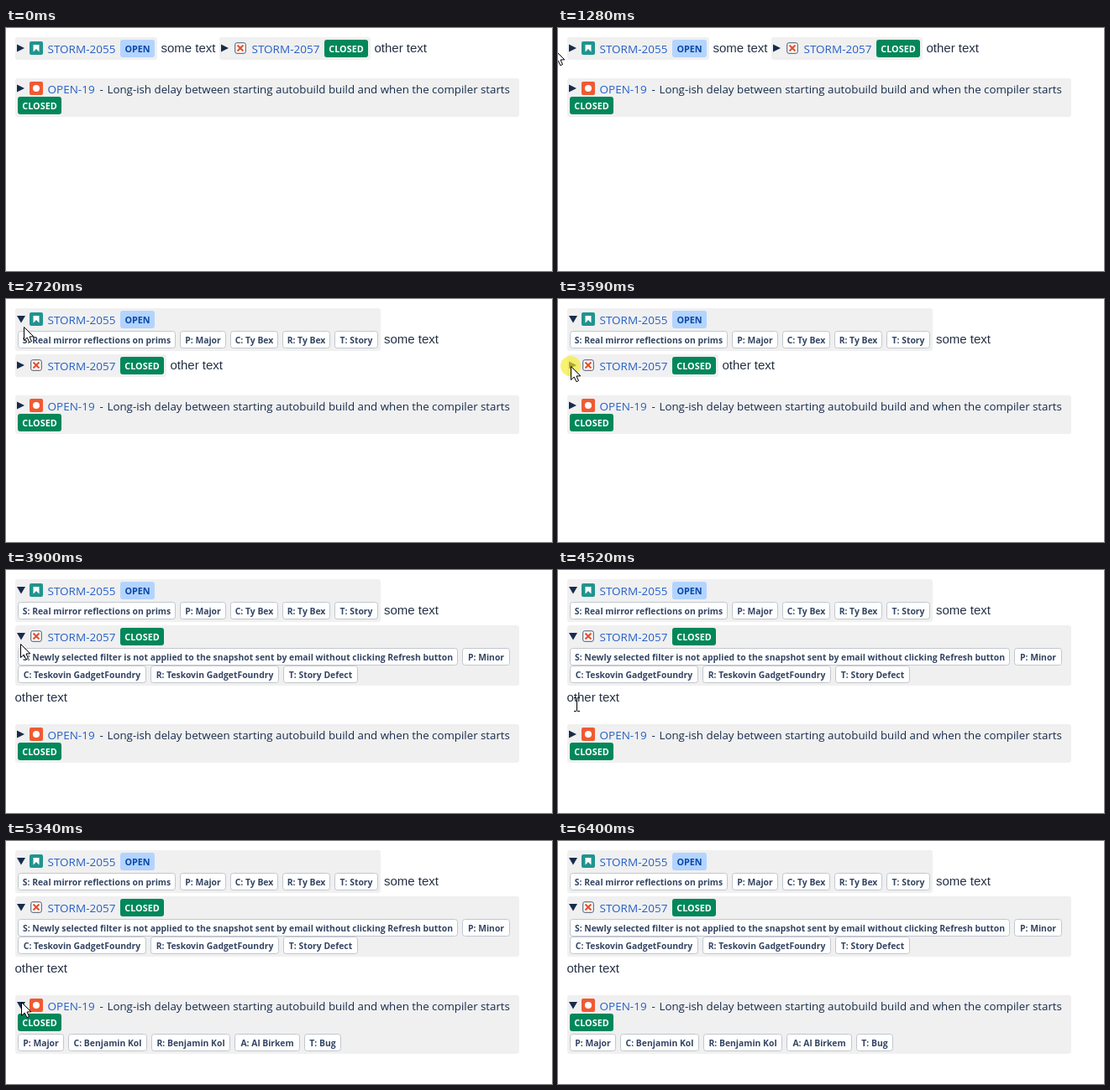
Recreate the animation shown at these times as an HTML page with a canvas. Size 650 px wide and 290 px high, loop 7.73 s.

```html
<!DOCTYPE html>
<html lang="en">
<head>
<meta charset="utf-8">
<title>Expandable issue macros</title>
<style>
html, body { margin: 0; width: 100%; height: 100%; overflow: hidden; background: #fff; }
canvas { display: block; }
</style>
</head>
<body>
<canvas id="stage" width="650" height="290"></canvas>
<script>
const ctx = document.getElementById('stage').getContext('2d');
const LOOP = 7730;
const UI = '"Open Sans", "Noto Sans", sans-serif';
const ARIAL = '15px "Liberation Sans", Arial, sans-serif';
const NAVY = '#172b4d', GREEN = '#00875a', ORANGE = '#f05a33', TEAL = '#20948f';

const expandAt = [2130, 3720, 5340];
const clicks = [[2070, 2130, 16, 21], [3590, 3720, 15, 80], [5200, 5340, 18, 192]];

// Pointer legs: start, end, steps, from, control, to
const legs = [
  [1280, 1590, 6, [-8, 27], [4, 24], [16, 21]],
  [2470, 3190, 12, [16, 21], [27.5, 34], [15, 78]],
  [3250, 3250, 1, [15, 78], [15, 79], [15, 80]],
  [3900, 4640, 12, [15, 80], [26, 128], [20, 176]],
  [4720, 5060, 6, [20, 176], [19, 184], [18, 192]],
  [6070, 6400, 5, [18, 192], [3, 192.5], [-13, 193]]
];

function text(s, x, y, font, color, align = 'left') {
  ctx.font = font;
  ctx.fillStyle = color;
  ctx.textAlign = align;
  ctx.fillText(s, x, y);
}

function box(x, y, w, h, fill, r = 3, stroke) {
  ctx.beginPath();
  ctx.roundRect(x, y, w, h, r);
  ctx.fillStyle = fill;
  ctx.fill();
  if (stroke) {
    ctx.strokeStyle = stroke;
    ctx.stroke();
  }
}

function poly(points, fill, stroke) {
  ctx.beginPath();
  points.forEach(p => ctx.lineTo(...p));
  ctx.closePath();
  ctx.fillStyle = fill;
  ctx.fill();
  if (stroke) {
    ctx.strokeStyle = stroke;
    ctx.stroke();
  }
}

const panel = (y, w, h) => box(11, y, w, h, '#f0f0f0');

function badge(x, y, label) {
  const open = label === 'OPEN', w = open ? 41 : 52;
  box(x, y, w, 21, open ? '#b3d4ff' : GREEN);
  text(label, x + w / 2, y + 15, `bold 10.8px ${UI}`, open ? '#0747a6' : '#fff', 'center');
}

function chips(y, list) {
  for (const [x, right, label] of list) {
    box(x + .5, y + .5, right - x - 1, 20, '#fff', 3, '#c1c7d0');
    text(label, (x + right) / 2, y + 14.5, `bold 10.37px ${UI}`, '#344563', 'center');
  }
}

const icons = {
  story() {
    box(28, 16, 16, 16, TEAL, 2);
    poly([[32.5, 20], [39.5, 20], [39.5, 28.5], [36, 25], [32.5, 28.5]], '#fff');
  },
  defect() {
    box(29.75, 17.75, 12.5, 12.5, '#fff', 2, '#42526e');
    ctx.beginPath();
    for (const s of [-1, 1]) {
      ctx.moveTo(36 - 3.5 * s, 20.5);
      ctx.lineTo(36 + 3.5 * s, 27.5);
    }
    ctx.lineWidth = 2.2;
    ctx.strokeStyle = '#e0532f';
    ctx.stroke();
    ctx.lineWidth = 1;
  },
  bug() {
    box(28, 16, 16, 16, ORANGE, 2);
    box(32, 20, 8, 8, '#fff', 4);
  }
};

function heading(dx, dy, open, icon, key) {
  ctx.save();
  ctx.translate(dx, dy);
  poly(open ? [[13, 20], [23, 20], [18, 28.5]] : [[13, 19.5], [22, 24], [13, 28.5]], NAVY);
  icons[icon]();
  text(key, 49.5, 29.5, `13.5px ${UI}`, '#2560c8');
  ctx.restore();
}

function page(open) {
  const [a, b, c] = open;

  if (a) panel(11, 435, 51);
  else panel(11, 169, 27);
  heading(0, 0, a, 'story', 'STORM-2055');
  badge(136, 14, 'OPEN');
  if (a) chips(38, [
    [14, 202, 'S: Real mirror reflections on prims'], [207, 262, 'P: Major'],
    [267, 324, 'C: Ty Bex'], [329, 386, 'R: Ty Bex'], [391, 443, 'T: Story']
  ]);
  text('some text', a ? 450 : 184.5, a ? 53 : 29, ARIAL, '#253044');

  const dx = a ? 0 : 243, dy = a ? 55 : 0;
  if (b) panel(66, 600, 72);
  else box(11 + dx, 11 + dy, 180, 27, '#f0f0f0');
  heading(dx, dy, b, 'defect', 'STORM-2057');
  badge(136 + dx, 14 + dy, 'CLOSED');
  if (b) {
    chips(93, [
      [14, 538, 'S: Newly selected filter is not applied to the snapshot sent by email without clicking Refresh button'],
      [543, 600, 'P: Minor']
    ]);
    chips(114, [
      [14, 167, 'C: Teskovin GadgetFoundry'], [172, 325, 'R: Teskovin GadgetFoundry'],
      [330, 419, 'T: Story Defect']
    ]);
  }
  text('other text', b ? 10.5 : a ? 195.5 : 438.5, b ? 157 : 29 + dy, ARIAL, '#253044');

  const y = b ? 184 : a ? 115 : 60;
  panel(y, 600, c ? 70 : 46);
  heading(0, y - 12, c, 'bug', 'OPEN-19');
  text('-', 111.5, y + 17.5, `13.3px ${UI}`, NAVY);
  text('Long-ish delay between starting autobuild build and when the compiler starts',
    120.5, y + 17.5, `13.3px ${UI}`, NAVY);
  badge(14, y + 22, 'CLOSED');
  if (c) chips(230, [
    [14, 69, 'P: Major'], [74, 168, 'C: Benjamin Kol'], [173, 267, 'R: Benjamin Kol'],
    [272, 350, 'A: Al Birkem'], [355, 399, 'T: Bug']
  ]);
}

function pointerAt(t) {
  const leg = legs.findLast(l => t >= l[0]);
  if (!leg) return null;
  const [start, end, n, from, mid, to] = leg;
  const done = Math.floor((t - start) / (end - start || 1) * (n - 1) + 1e-6) + 1;
  const u = Math.min(n, done) / n, v = 1 - u;
  return from.map((p, i) => Math.round(v * v * p + 2 * u * v * mid[i] + u * u * to[i]));
}

function pointer([x, y]) {
  ctx.save();
  ctx.translate(x, y);
  if (y > 143 && y < 170) {
    // Text caret while over the paragraph
    ctx.fillStyle = '#000';
    ctx.fillRect(0, -7, 1, 15);
    for (const [sx, sy] of [[-3, -8], [1, -8], [-3, 8], [1, 8]]) ctx.fillRect(sx, sy, 3, 1);
  } else {
    ctx.translate(.5, .5);
    poly([[0, 0], [0, 16], [3.7, 12.6], [6.4, 18.2], [9, 17], [6.5, 11.5], [11.3, 11.3]], '#fff', '#000');
  }
  ctx.restore();
}

function draw(now) {
  const t = now % LOOP;
  ctx.fillStyle = '#fff';
  ctx.fillRect(0, 0, 650, 290);
  page(expandAt.map(at => t >= at));
  for (const [on, off, x, y] of clicks)
    if (t >= on && t < off) box(x - 12, y - 12, 24, 24, 'rgba(246, 236, 40, .66)', 12);
  const at = pointerAt(t);
  if (at) pointer(at);
}

const begin = performance.now();
function tick() {
  draw(performance.now() - begin);
  requestAnimationFrame(tick);
}
tick();
</script>
</body>
</html>
```
